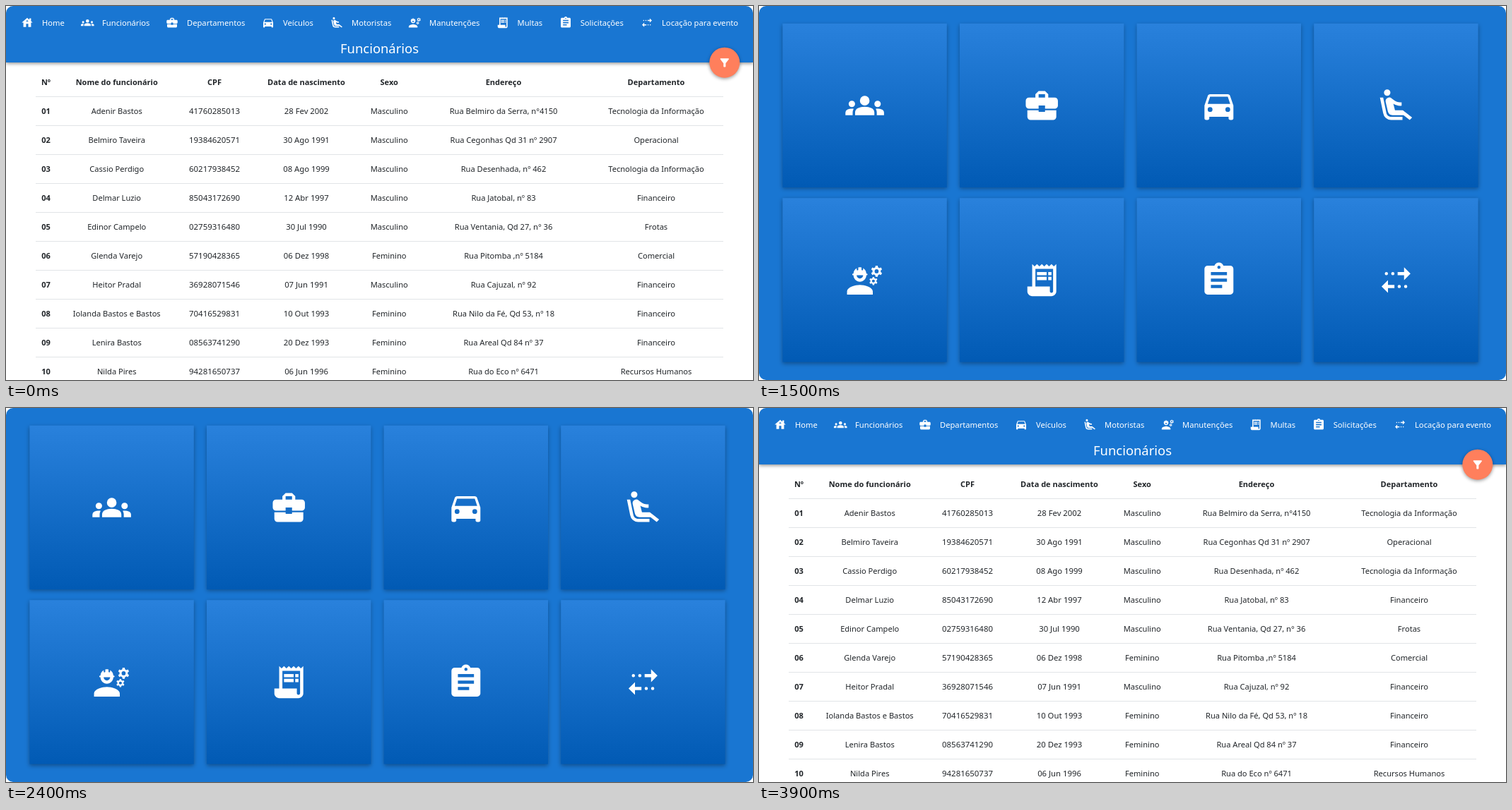
An HTML page with a canvas for the animation above (4.5 s loop, 1057 by 530 pixels).

```html
<!DOCTYPE html>
<html lang="pt-BR">
<head>
<meta charset="utf-8">
<title>Funcionários</title>
<style>
html, body { margin: 0; width: 100%; height: 100%; overflow: hidden; background: #fff; }
canvas { display: block; }
</style>
</head>
<body>
<canvas id="stage" width="1057" height="530"></canvas>
<script>
const W = 1057, H = 530, BLUE = '#1976d2';
const SCENE_MS = 1500, LOOP_MS = 4500;
const FONT = '"Noto Sans", "Open Sans", sans-serif';
const ctx = document.getElementById('stage').getContext('2d');

// Outline of a six-toothed cog with a round hole
function cog(cx, cy, r, hole) {
  let d = '';
  for (let k = 0; k < 6; k++) {
    for (const [deg, f] of [[-19, .73], [-11, 1], [11, 1], [19, .73]]) {
      const a = (k * 60 + deg - 90) * Math.PI / 180;
      d += (d ? 'L' : 'M') + (cx + r * f * Math.cos(a)) + ' ' + (cy + r * f * Math.sin(a));
    }
  }
  return d + 'z' + disc(cx, cy, hole);
}

function disc(cx, cy, r) {
  return `M${cx - r} ${cy}a${r} ${r} 0 1 0 ${2 * r} 0a${r} ${r} 0 1 0 ${-2 * r} 0z`;
}

// Icons on a 24-unit grid
const shapes = {
  home: 'M19 9.3V4h-3v2.6L12 3 2 12h3v8h5v-6h4v6h5v-8h3l-3-2.7zM10 10c0-1.1.9-2 2-2s2 .9 2 2h-4z',
  people: 'M12 12.75c1.63 0 3.07.39 4.24.9 1.08.48 1.76 1.56 1.76 2.73V18H6v-1.61c0-1.18.68-2.26 1.76-2.73 1.17-.52 2.61-.91 4.24-.91z' +
    'M5.13 14.1c-.37-.06-.74-.1-1.13-.1-.99 0-1.93.21-2.78.58A2.01 2.01 0 0 0 0 16.43V18h4.5v-1.61c0-.83.23-1.61.63-2.29z' +
    'M24 16.43c0-.81-.48-1.53-1.22-1.85A6.95 6.95 0 0 0 20 14c-.39 0-.76.04-1.13.1.4.68.63 1.46.63 2.29V18H24z' +
    disc(4, 11, 2) + disc(20, 11, 2) + disc(12, 9, 3),
  briefcase: 'M10 16v-1H3v4c0 1.11.89 2 2 2h14c1.11 0 2-.89 2-2v-4h-7v1z' +
    'M20 7h-4V5l-2-2h-4L8 5v2H4c-1.1 0-2 .9-2 2v3c0 1.11.89 2 2 2h6v-2h4v2h6c1.1 0 2-.9 2-2V9c0-1.1-.9-2-2-2zM14 7h-4V5h4z',
  car: 'M18.92 6.01C18.72 5.42 18.16 5 17.5 5h-11c-.66 0-1.21.42-1.42 1.01L3 12v8c0 .55.45 1 1 1h1c.55 0 1-.45 1-1v-1h12v1c0 .55.45 1 1 1h1c.55 0 1-.45 1-1v-8z' +
    'M5 11l1.5-4.5h11L19 11z' + disc(6.5, 14.5, 1.5) + disc(17.5, 14.5, 1.5),
  seat: 'M16 19H8.93c-1.48 0-2.74-1.08-2.96-2.54L4 7H2l1.99 9.76A5.01 5.01 0 0 0 8.94 21H16z' +
    'M16.23 15h-4.88l-1.03-4.1c1.58.89 3.28 1.54 5.15 1.22V9.99c-1.63.31-3.44-.27-4.69-1.25L9.14 7.47c-.23-.18-.49-.3-.76-.38a2.21 2.21 0 0 0-.99-.06h-.02a2.268 2.268 0 0 0-1.84 2.61l1.35 5.92A3.008 3.008 0 0 0 9.83 18h6.85l3.82 3 1.5-1.5z' +
    disc(6.5, 4, 2),
  engineer: 'M9 15c-2.67 0-8 1.34-8 4v2h16v-2c0-2.66-5.33-4-8-4z' +
    'M4.74 9H5c0 2.21 1.79 4 4 4s4-1.79 4-4h.26c.27 0 .49-.22.49-.49a.49.49 0 0 0-.49-.51H13c0-1.48-.81-2.75-2-3.45v.95c0 .28-.22.5-.5.5s-.5-.22-.5-.5V4.14C9.68 4.06 9.35 4 9 4s-.68.06-1 .14V5.5c0 .28-.22.5-.5.5S7 5.78 7 5.5v-.95C5.81 5.25 5 6.52 5 8h-.26a.49.49 0 0 0-.49.49c0 .29.22.51.49.51zM11 9c0 1.1-.9 2-2 2s-2-.9-2-2z' +
    cog(19.4, 6.5, 3.55, 1.25) + cog(17.4, 12.6, 2.6, .9),
  receipt: 'M19.5 3.5L18 2l-1.5 1.5L15 2l-1.5 1.5L12 2l-1.5 1.5L9 2 7.5 3.5 6 2v14H3v3c0 1.66 1.34 3 3 3h12c1.66 0 3-1.34 3-3V2z' +
    'M19 19c0 .55-.45 1-1 1s-1-.45-1-1v-3H8V5h11zM9 7h6v2H9zM16 7h2v2h-2zM9 10h6v2H9zM16 10h2v2h-2z',
  clipboard: 'M19 3h-4.18C14.4 1.84 13.3 1 12 1s-2.4.84-2.82 2H5c-1.1 0-2 .9-2 2v14c0 1.1.9 2 2 2h14c1.1 0 2-.9 2-2V5c0-1.1-.9-2-2-2z' +
    'M14 17H7v-2h7zM17 13H7v-2h10zM17 9H7V7h10z' + disc(12, 4, 1),
  arrows: 'M17 4l4 4-4 4V9h-4V7h4zM7 20l-4-4 4-4v3h4v2H7z' +
    disc(10, 8, 1) + disc(6, 8, 1) + disc(14, 16, 1) + disc(18, 16, 1),
  funnel: 'M4.25 5.61C6.27 8.2 10 13 10 13v6c0 .55.45 1 1 1h2c.55 0 1-.45 1-1v-6s3.72-4.8 5.74-7.39A1 1 0 0 0 18.95 4H5.04c-.83 0-1.3.95-.79 1.61z'
};
const icons = {};
for (const key in shapes) icons[key] = new Path2D(shapes[key]);

// Icon, icon centre, label, label left edge
const menu = [
  ['home', 30, 'Home', 51],
  ['people', 115.3, 'Funcionários', 136],
  ['briefcase', 235, 'Departamentos', 256],
  ['car', 371, 'Veículos', 392],
  ['seat', 468.2, 'Motoristas', 489],
  ['engineer', 578.4, 'Manutenções', 599],
  ['receipt', 702.7, 'Multas', 723.5],
  ['clipboard', 792, 'Solicitações', 812.7],
  ['arrows', 907, 'Locação para evento', 928]
];

// Heading, column centre, font size
const columns = [
  ['Nº', 56.5, 11.1],
  ['Nome do funcionário', 156.7, 11.1],
  ['CPF', 295, 11.45],
  ['Data de nascimento', 425, 11.3],
  ['Sexo', 542.2, 11.1],
  ['Endereço', 704, 11.1],
  ['Departamento', 920, 11.1]
];

const M = 'Masculino', F = 'Feminino';
const TI = 'Tecnologia da Informação', FIN = 'Financeiro';
const staff = [
  ['Adenir Bastos', '41760285013', '28 Fev 2002', M, 'Rua Belmiro da Serra, n°4150', TI],
  ['Belmiro Taveira', '19384620571', '30 Ago 1991', M, 'Rua Cegonhas Qd 31 nº 2907', 'Operacional'],
  ['Cassio Perdigo', '60217938452', '08 Ago 1999', M, 'Rua Desenhada, nº 462', TI],
  ['Delmar Luzio', '85043172690', '12 Abr 1997', M, 'Rua Jatobal, nº 83', FIN],
  ['Edinor Campelo', '02759316480', '30 Jul 1990', M, 'Rua Ventania, Qd 27, n° 36', 'Frotas'],
  ['Glenda Varejo', '57190428365', '06 Dez 1998', F, 'Rua Pitomba ,nº 5184', 'Comercial'],
  ['Heitor Pradal', '36928071546', '07 Jun 1991', M, 'Rua Cajuzal, nº 92', FIN],
  ['Iolanda Bastos e Bastos', '70416529831', '10 Out 1993', F, 'Rua Nilo da Fé, Qd 53, nº 18', FIN],
  ['Lenira Bastos', '08563741290', '20 Dez 1993', F, 'Rua Areal Qd 84 nº 37', FIN],
  ['Nilda Pires', '94281650737', '06 Jun 1996', F, 'Rua do Eco nº 6471', 'Recursos Humanos']
];

function icon(name, cx, cy, size) {
  const s = size / 24;
  ctx.save();
  ctx.translate(cx - size / 2, cy - size / 2);
  ctx.scale(s, s);
  ctx.fillStyle = '#fff';
  ctx.fill(icons[name], 'evenodd');
  ctx.restore();
}

function text(str, x, y, size, color, align = 'center', weight = 400) {
  ctx.font = `${weight} ${size}px ${FONT}`;
  ctx.fillStyle = color;
  ctx.textAlign = align;
  ctx.fillText(str, x, y);
}

function shadowed(alpha, blur, dy, draw) {
  ctx.save();
  ctx.shadowColor = `rgba(0,0,0,${alpha})`;
  ctx.shadowBlur = blur;
  ctx.shadowOffsetY = dy;
  draw();
  ctx.restore();
}

function drawTable() {
  const ink = '#212529';
  columns.forEach(([label, x]) => text(label, x, 112, 11, ink, 'center', 700));
  staff.forEach((person, i) => {
    const y = 128 + i * 41;
    ctx.fillStyle = '#e1e4e7';
    ctx.fillRect(42, y, 973, 1);
    text(String(i + 1).padStart(2, '0'), columns[0][1], y + 25, 11.1, ink, 'center', 700);
    person.forEach((value, c) => {
      const [, x, size] = columns[c + 1];
      text(value, x, y + 25, size, ink);
    });
  });
}

function drawHeader() {
  ctx.fillStyle = BLUE;
  shadowed(.45, 5, 1.5, () => ctx.fillRect(0, 0, W, 80));
  for (const [name, cx, label, x] of menu) {
    icon(name, cx, 23.6, 18.6);
    text(label, x, 28, 11.2, '#fff', 'left');
  }
  text('Funcionários', 528.5, 66.5, 18.4, '#fff');
}

function drawList() {
  ctx.fillStyle = '#fff';
  ctx.fillRect(0, 0, W, H);
  drawTable();
  drawHeader();
  ctx.fillStyle = '#ff7f5c';
  ctx.beginPath();
  ctx.arc(1016.8, 80.2, 21.5, 0, Math.PI * 2);
  shadowed(.4, 5, 1.5, () => ctx.fill());
  icon('funnel', 1016.8, 80.4, 18.6);
}

function drawTiles() {
  const side = 232.4;
  ctx.fillStyle = BLUE;
  ctx.fillRect(0, 0, W, H);
  menu.slice(1).forEach(([name], i) => {
    const x = 33.4 + (i % 4) * 250.6, y = 24.8 + Math.floor(i / 4) * 247.4;
    const fade = ctx.createLinearGradient(0, y, 0, y + side);
    fade.addColorStop(0, '#2981dc');
    fade.addColorStop(1, '#015ab4');
    ctx.fillStyle = fade;
    shadowed(.32, 6, 2, () => ctx.fillRect(x, y, side, side));
    icon(name, x + side / 2, y + side / 2, 54.6);
  });
}

function render() {
  const t = performance.now() % LOOP_MS;
  ctx.clearRect(0, 0, W, H);
  ctx.save();
  ctx.beginPath();
  ctx.roundRect(0, 0, W, H, 10);
  ctx.clip();
  if (Math.floor(t / SCENE_MS) === 1) drawTiles();
  else drawList();
  ctx.restore();
  requestAnimationFrame(render);
}
render();
</script>
</body>
</html>
```
